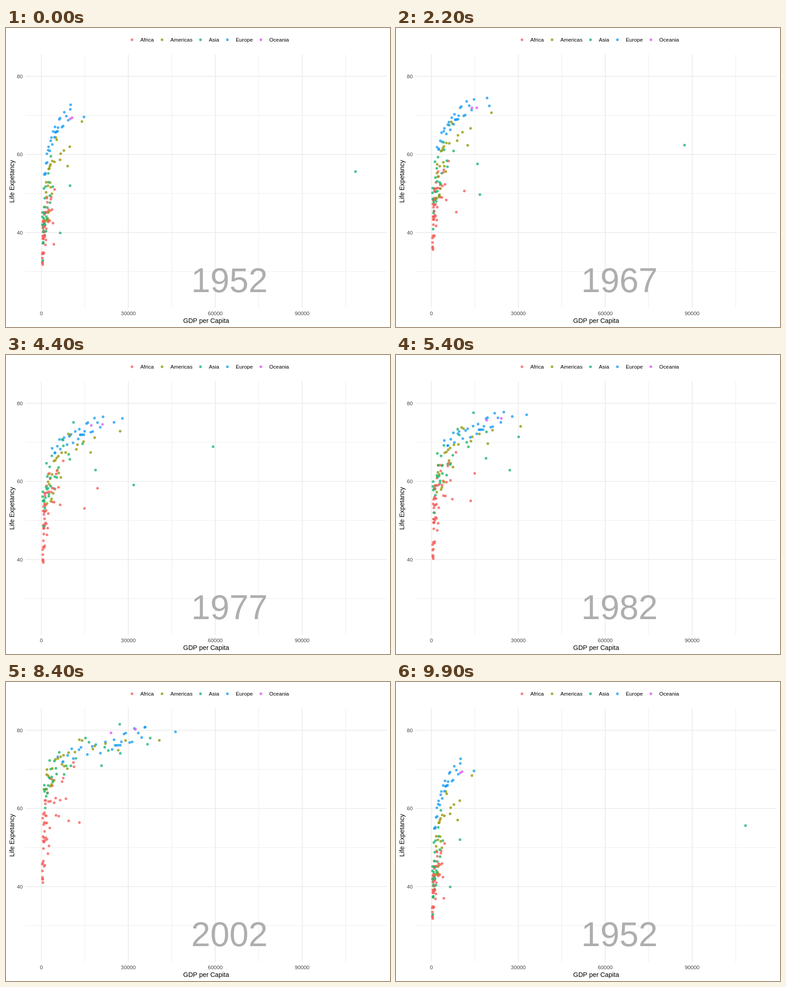
An HTML page with a canvas for the animation above (10 s loop, 849 px wide and 660 px high).

```html
<!DOCTYPE html>
<html lang="en">
<head>
<meta charset="utf-8">
<title>Life expectancy and GDP</title>
<style>
  html, body { margin: 0; width: 100%; height: 100%; overflow: hidden; background: #fff; }
  canvas { display: block; }
</style>
</head>
<body>
<canvas id="stage" width="849" height="660"></canvas>
<script>
const ctx = document.getElementById('stage').getContext('2d');
const STATES = 12;
// Frame at which a five-year state is reached; the last state is the first again.
const keyFrame = k => k < 6 ? Math.max(0, 9 * k - 1) : 8 * k + 3;

// Each crowd has the lowest, median and highest GDP (in thousands), the range of
// life expectancy and its spread, for the start, middle and end of the period.
const GROUPS = [
  { name: 'Africa', color: '#f35e5a', x: 278.5, count: 49,
    gdp: [[0.3, 0.98, 4.7], [0.48, 1.3, 8.2], [0.28, 1.4, 12.5]],
    life: [[35, 46], [44, 60], [47, 63]], spread: [6, 10] },
  { name: 'Americas', color: '#929705', x: 345, count: 24,
    gdp: [[1.4, 3.05, 11], [1.9, 6, 22], [1.2, 7.6, 36]],
    life: [[44, 63], [56, 73], [67, 79]], spread: [8, 3.5] },
  { name: 'Asia', color: '#18b56a', x: 430, count: 30,
    gdp: [[0.33, 1.1, 4.1], [0.4, 2.8, 17], [0.9, 4.2, 47]],
    life: [[36, 55], [51, 74], [62, 81]], spread: [8, 4] },
  { name: 'Europe', color: '#189cf3', x: 489.5, count: 28,
    gdp: [[1, 4.6, 10], [4.2, 14.3, 23], [5.9, 27.5, 39]],
    life: [[54, 65.5, 70.5], [69, 76], [73, 80.5]], spread: [2] },
  { name: 'Oceania', color: '#dc59f0', x: 563.5, count: 0 }
];

// Dots away from the crowds: group, GDP, life expectancy, evenly spread in time.
const TRACKS = [
  [2, [108.4, 113.5, 95.46, 80.9, 109.35, 59.27, 31.35, 28.12, 34.93, 40.3, 35.11, 47.31],
      [55.6, 70.2, 77.6]],
  [2, [6.5, 12.7, 34, 26.2, 19.3, 21.7], [39.9, 61, 72.8]],
  [2, [9.9, 18.5, 19, 29.8], [52, 76]],
  [0, [2.4, 9.2, 21.4, 14, 9.5, 12.1], [42.7, 59.8, 74]],
  [0, [4.3, 7, 15.5, 13.2, 13, 13.2], [37, 54.7, 56.7]],
  [1, [14, 43], [68.4, 78.2]],
  [3, [10.1, 49.4], [72.7, 80.2]],
  [3, [14.7, 37.5], [69.6, 81.7]],
  [4, [10, 34.4], [69.1, 81.2]],
  [4, [10.6, 25.2], [69.4, 80.2]]
];

let seed = 1952;
function rand() {
  seed = (seed * 1664525 + 1013904223) % 4294967296;
  return seed / 4294967296;
}

const lerp = (a, b, t) => a + (b - a) * t;
const toX = gdp => 78.2 + gdp * 6.407;
const toY = life => 796.5 - life * 8.625;

// Value at t (0 to 1) on a line through evenly spaced points.
function along(list, t) {
  const p = t * (list.length - 1);
  const i = Math.min(Math.floor(p), list.length - 2);
  return i < 0 ? list[0] : lerp(list[i], list[i + 1], p - i);
}

const dots = [];
function addDot(group, place) {
  const path = Array.from({ length: STATES }, (_, k) => {
    const [gdp, life] = place(k / (STATES - 1));
    return [toX(gdp), toY(life)];
  });
  dots.push({ color: GROUPS[group].color, path, order: rand() });
}

for (const [group, gdp, life] of TRACKS) {
  addDot(group, t => [along(gdp, t), along(life, t)]);
}
// One dot drops sharply around 1992.
addDot(0, t => [0.7, 43 + 4 * t - 22.3 * Math.exp(-1.2 * (t * 11 - 8) ** 2)]);

GROUPS.forEach(({ count, gdp, life, spread }, group) => {
  for (let i = 0; i < count; i++) {
    const side = 2 * (i + rand()) / count - 1;
    const rank = 0.5 + 0.5 * Math.sign(side) * Math.abs(side) ** 1.3;
    const offset = rand() * 2 - 1;
    const logGdp = gdp.map(row => along(row.map(Math.log), rank));
    const mean = life.map(row => along(row, rank));
    addDot(group, t => [
      Math.exp(along(logGdp, t)),
      along(mean, t) + offset * along(spread, t)
    ]);
  }
});
dots.sort((a, b) => a.order - b.order);

function text(str, x, y, size, color, align = 'center') {
  ctx.font = `${size}px "Liberation Sans", Arial, sans-serif`;
  ctx.fillStyle = color;
  ctx.textAlign = align;
  ctx.fillText(str, x, y);
}

function line(x1, y1, x2, y2, width) {
  ctx.strokeStyle = '#e8e8e8';
  ctx.lineWidth = width;
  ctx.beginPath();
  ctx.moveTo(x1, y1);
  ctx.lineTo(x2, y2);
  ctx.stroke();
}

function circle(x, y, color) {
  ctx.globalAlpha = 0.77;
  ctx.fillStyle = color;
  ctx.beginPath();
  ctx.arc(x, y, 2.95, 0, Math.PI * 2);
  ctx.fill();
  ctx.globalAlpha = 1;
}

function drawGrid(gdps, lives, width) {
  for (const life of lives) line(43, toY(life), 842, toY(life), width);
  for (const gdp of gdps) line(toX(gdp), 58, toX(gdp), 618, width);
}

function drawChart() {
  ctx.fillStyle = '#fff';
  ctx.fillRect(0, 0, 849, 660);
  const gdps = [0, 30, 60, 90];
  const lives = [40, 60, 80];
  drawGrid(gdps.map(g => g + 15), lives.map(l => l - 10), 0.8);
  drawGrid(gdps, lives, 1.5);
  for (const g of gdps) text(g * 1000, toX(g), 633.7, 11.73, '#444');
  for (const l of lives) text(l, 37, toY(l) + 4.4, 11.73, '#444', 'right');
  text('GDP per Capita', 442.5, 650.5, 14.4, '#000');
  ctx.save();
  ctx.translate(17.5, 338.5);
  ctx.rotate(-Math.PI / 2);
  text('Life Expetancy', 0, 0, 14.4, '#000');
  ctx.restore();
  for (const g of GROUPS) {
    circle(g.x, 26, g.color);
    text(g.name, g.x + 18.4, 30.2, 11.73, '#000', 'left');
  }
}

function draw(now) {
  const frame = Math.floor(now / 100) % 100;
  let from = 0;
  while (from < STATES - 1 && keyFrame(from + 1) <= frame) from++;
  const part = (frame - keyFrame(from)) / (keyFrame(from + 1) - keyFrame(from));
  const year = 1952 + 5 * (Math.round(from + part) % STATES);

  drawChart();
  for (const { path, color } of dots) {
    const a = path[from], b = path[(from + 1) % STATES];
    circle(lerp(a[0], b[0], part), lerp(a[1], b[1], part), color);
  }
  text(year, 494, 583, 76, '#aeaeae');
}

const start = performance.now();
function tick() {
  draw(performance.now() - start);
  requestAnimationFrame(tick);
}
tick();
</script>
</body>
</html>
```
